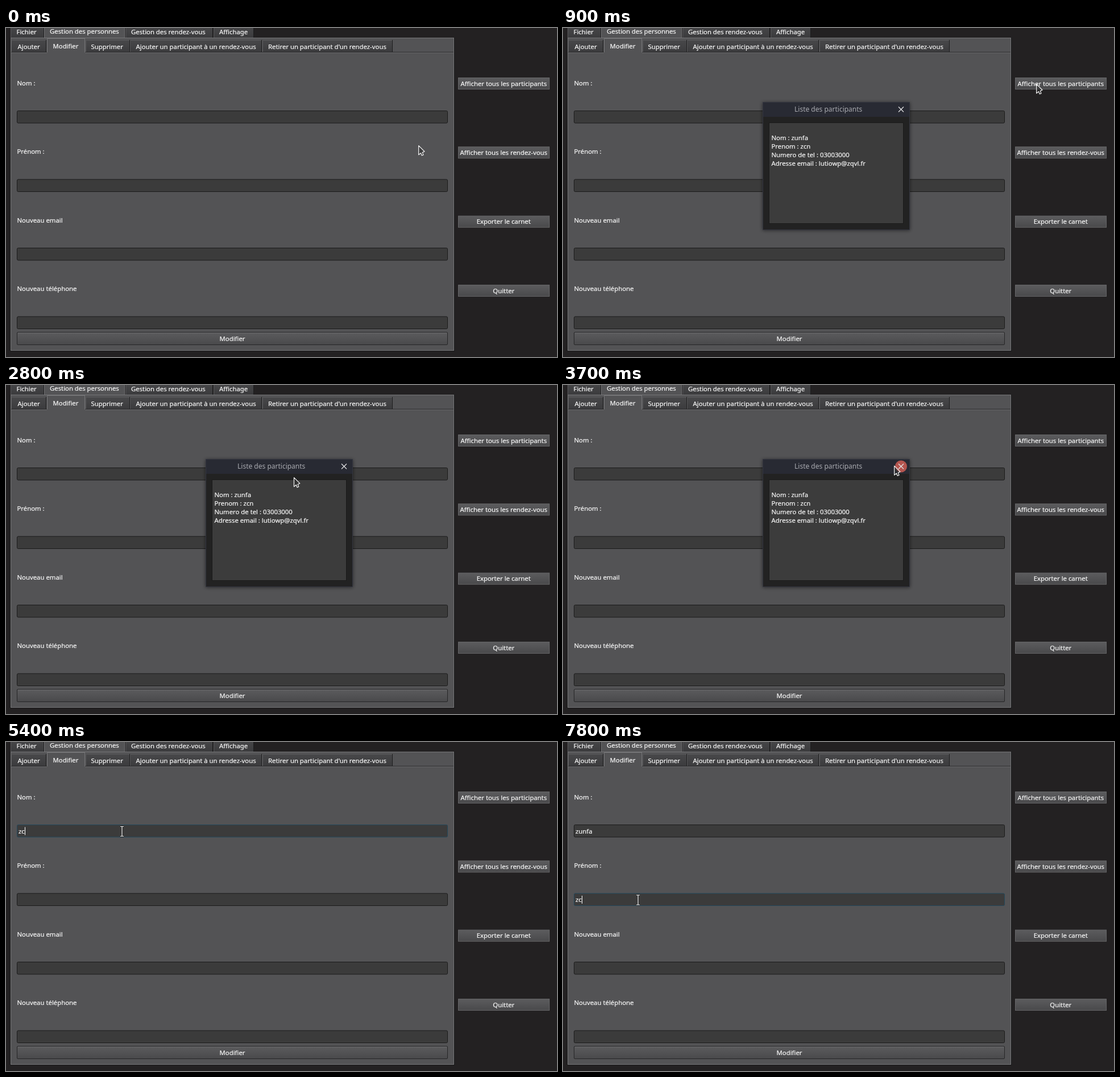
Animation, 969 px wide and 578 px high, one loop 8000 ms. Source, as an HTML page:

```html
<!DOCTYPE html>
<html lang="fr">
<head>
<meta charset="utf-8">
<title>Carnet</title>
<style>
html, body { margin: 0; width: 100%; height: 100%; overflow: hidden; background: #232122; }
svg { display: block; }
text { font: 11.33px "Noto Sans", "Open Sans", sans-serif; fill: #f6f6f6; stroke: #f6f6f6; stroke-width: .22px; white-space: pre; }
.mid { text-anchor: middle; }
.title { font-size: 12px; fill: #a9aab0; stroke: none; }
.field { fill: #3b3b3b; stroke: #1b1b1b; }
.focus { stroke: #23485c; }
.hover { filter: brightness(1.12); }
</style>
</head>
<body>
<svg id="stage" width="969" height="578" viewBox="0 0 969 578">
  <defs>
    <linearGradient id="btn" x2="0" y2="1">
      <stop stop-color="#5c5c5e"/><stop offset="1" stop-color="#49494b"/>
    </linearGradient>
    <linearGradient id="tab" x2="0" y2="1">
      <stop stop-color="#48484a"/><stop offset="1" stop-color="#3b3b3d"/>
    </linearGradient>
    <filter id="shadow" x="-10%" y="-10%" width="120%" height="120%">
      <feDropShadow dx="0" dy="1" stdDeviation="3" flood-opacity=".55"/>
    </filter>
  </defs>
  <g id="back"></g>
  <g id="dialog">
    <rect x="351" y="130" width="259" height="224.5" fill="#222021" filter="url(#shadow)"/>
    <rect x="351" y="130" width="259" height="26" fill="#282a33"/>
    <rect x="351.5" y="130.5" width="258" height="224" fill="none" stroke="#343640"/>
    <text class="title mid" x="466.7" y="147">Liste des participants</text>
    <circle id="close" cx="594.5" cy="143" r="10.5" fill="#b4554f"/>
    <path d="M590 138.5l9 9m0-9l-9 9" stroke="#e2e2e4" stroke-width="1.2"/>
    <rect x="362.5" y="166.5" width="236" height="177" fill="#3c3c3c" stroke="#1b1b1b"/>
    <g id="list"></g>
  </g>
  <path id="caret" stroke="#fff" d="M0 0v14"/>
  <path id="arrow" d="M.7 .7V16.8L4.5 13.6L6.2 18L9 16.9L7.3 12.6L11 11Z" fill="rgba(45,45,45,.55)" stroke="#f4f4f4" stroke-width="1.2" stroke-linejoin="round"/>
  <g id="beam" fill="none">
    <path d="M-3 -8.5H3M-3 8.5H3M0 -8.5V8.5" stroke="#222" stroke-width="3"/>
    <path d="M-3 -8.5H3M-3 8.5H3M0 -8.5V8.5" stroke="#fff" stroke-width="1.2"/>
  </g>
</svg>
<script>
const LOOP = 8000, STEP = 100;
const $ = id => document.getElementById(id);
const label = (x, y, s, cls = '') => `<text class="${cls}" x="${x}" y="${y}">${s}</text>`;
const rect = (x, y, w, h, attrs) => `<rect x="${x}" y="${y}" width="${w}" height="${h}" ${attrs}/>`;
const line = (d, color) => `<path d="${d}" fill="none" stroke="${color}"/>`;

const fieldTops = [145.5, 266, 386.5, 507];
const buttonTops = [87, 208.3, 329.7, 451];

// A tab strip: [left, right, text x, text, selected]
function tabs(list, top, bottom, baseline) {
  return list.map(([l, r, x, s, on]) => {
    const y = on ? top - 3 : top;
    return rect(l, y, r - l, bottom - y, `fill="${on ? '#535355' : 'url(#tab)'}"`)
      + line(`M${l + .5} ${bottom}V${y + .5}H${r - .5}`, on ? '#757577' : '#59595b')
      + line(`M${r - .5} ${y}V${bottom}`, on ? '#757577' : '#1d1d1e')
      + label(x, baseline - (on ? .6 : 0), s);
  }).join('');
}

function background() {
  let s = tabs([
    [8, 67, 18.5, 'Fichier'], [67, 209, 77, 'Gestion des personnes', true],
    [210, 364, 220, 'Gestion des rendez-vous'], [365, 436, 375, 'Affichage']
  ], -4, 17, 11);
  s += rect(8.5, 17.5, 779, 549, 'fill="#535355" stroke="#767678"');
  s += line('M7.5 17V567.5H788.5V17', '#161617');
  s += tabs([
    [9, 71, 20.5, 'Ajouter'], [72, 139, 82.5, 'Modifier', true], [140, 218, 149.5, 'Supprimer'],
    [218, 450, 228.5, 'Ajouter un participant à un rendez-vous'],
    [451, 680, 461, "Retirer un participant d'un rendez-vous"]
  ], 21, 43, 37);
  s += line('M9 42.5H72M139 42.5H787', '#29292a') + line('M9 43.5H72M139 43.5H787', '#6b6b6d');
  ['Nom :', 'Prénom :', 'Nouveau email', 'Nouveau téléphone'].forEach((name, i) => {
    const y = fieldTops[i];
    s += label(19.5, y - 44.7, name)
      + rect(19.5, y, 757, 21.5, `rx="2" class="field" id="field${i}"`)
      + `<text id="value${i}" x="22" y="${y + 15.2}"></text>`;
  });
  s += rect(19.5, 534.5, 757, 22, 'rx="1.5" fill="url(#btn)" stroke="#262627"')
    + line('M21 535.5H775', '#6c6c6e') + label(398, 550, 'Modifier', 'mid');
  ['Afficher tous les participants', 'Afficher tous les rendez-vous', 'Exporter le carnet', 'Quitter']
    .forEach((name, i) => {
      const y = buttonTops[i];
      s += rect(795.5, y + .5, 160, 20, `id="button${i}" fill="url(#btn)" stroke="#656567"`)
        + label(875.3, y + 14.6, name, 'mid');
    });
  return s;
}

$('back').innerHTML = background();
$('list').innerHTML = ['Nom : zunfa', 'Prenom : zcn', 'Numero de tel : 03003000', 'Adresse email : lutiowp@zqvl.fr']
  .map((s, i) => label(366.5, 197 + i * 14.85, s)).join('');

// Pointer waypoints: [time, x, y]
const path = [
  [0, 725, 206], [700, 832, 98], [900, 832, 98], [1700, 416, 191], [1800, 416, 191],
  [1900, 410, 193], [2100, 402, 191], [2300, 402, 191], [3200, 580, 141], [3300, 580, 141],
  [3400, 582, 141.5], [3800, 582, 141.5], [4100, 206, 157], [4400, 206, 157], [4500, 204, 157],
  [5500, 204, 157], [5600, 203, 157], [5900, 203, 157], [6000, 203, 156], [6800, 203, 156],
  [7400, 132, 277.5], [LOOP, 132, 277.5]
];
const typed = [
  [[0, ''], [5100, 'z'], [5400, 'zc'], [5800, 'z'], [6000, 'zu'], [6100, 'zun'], [6300, 'zunf'], [6500, 'zunfa']],
  [[0, ''], [7700, 'z'], [7800, 'zc']]
];

function pointer(t) {
  const i = path.findIndex(p => p[0] > t), [t0, x0, y0] = path[i - 1], [t1, x1, y1] = path[i];
  const k = (t - t0) / (t1 - t0), e = k * k * (3 - 2 * k);
  return [x0 + (x1 - x0) * e, y0 + (y1 - y0) * e];
}
const inside = (x, y, l, t, r, b) => x > l && x < r && y > t && y < b;
const show = (id, on) => $(id).setAttribute('display', on ? 'inline' : 'none');
const move = (id, x, y) => $(id).setAttribute('transform', `translate(${x} ${y})`);

function draw(now) {
  const t = Math.floor(now % LOOP / STEP) * STEP;
  const [x, y] = pointer(t);
  const open = t >= 900 && t < 3800;
  const overDialog = open && inside(x, y, 351, 130, 610, 354);
  const beam = overDialog ? inside(x, y, 362, 166, 598, 343)
    : fieldTops.some(top => inside(x, y, 19, top, 777, top + 22));
  show('dialog', open);
  show('close', t >= 3200);
  show('beam', beam);
  show('arrow', !beam);
  move('beam', x, y);
  move('arrow', x, y);
  $('button0').classList.toggle('hover', !open && inside(x, y, 795, 87, 956, 108));

  const focus = t < 4300 ? -1 : t < 7500 ? 0 : 1;
  typed.forEach((keys, i) => {
    $('value' + i).textContent = keys.filter(k => k[0] <= t).pop()[1];
    $('field' + i).classList.toggle('focus', i === focus);
  });
  show('caret', focus >= 0 && !(t >= 4800 && t < 5100));
  if (focus >= 0) {
    const end = 22.5 + $('value' + focus).getComputedTextLength();
    move('caret', Math.floor(end) + .5, fieldTops[focus] + 4);
  }
}

const start = performance.now();
function tick() {
  draw(performance.now() - start);
  requestAnimationFrame(tick);
}
tick();
</script>
</body>
</html>
```
